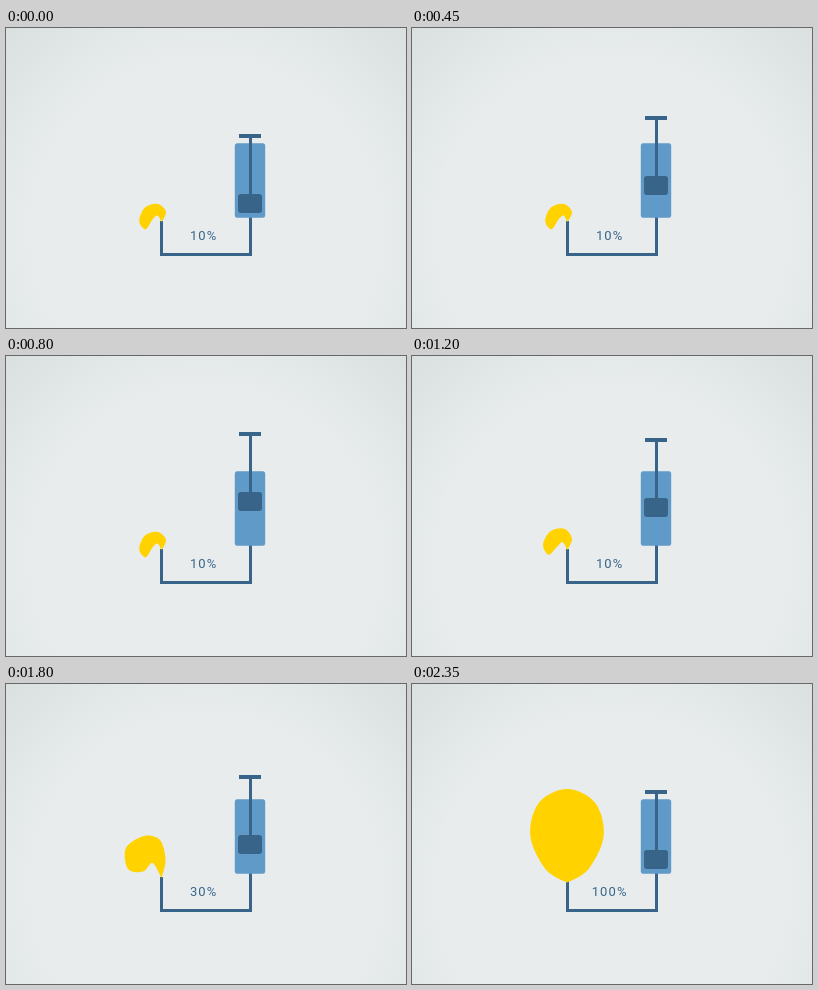
Write an HTML page that moves like this. It is 400x300 px and loops after 2.9 s.

```html
<!DOCTYPE html>
<html lang="en">
<head>
<meta charset="utf-8">
<title>Balloon pump</title>
<style>
  html, body { margin: 0; width: 100%; height: 100%; overflow: hidden; background: #e8eced; }
  svg { display: block; width: 100%; height: 100%; }
  text { font: 400 13px Roboto, "Open Sans", sans-serif; letter-spacing: 1.1px; fill: #38648a; }
</style>
</head>
<body>
<svg viewBox="0 0 400 300">
  <defs>
    <radialGradient id="glow" gradientUnits="userSpaceOnUse" cx="200" cy="205" r="290">
      <stop offset=".6" stop-color="#e8eced"/>
      <stop offset="1" stop-color="#d9e0df"/>
    </radialGradient>
  </defs>
  <rect width="400" height="300" fill="url(#glow)"/>
  <path d="M155.5 193V226.5H244.5V188" fill="none" stroke="#38648a" stroke-width="3"/>
  <rect x="228.8" y="115.3" width="30.4" height="74.4" rx="2.5" fill="#5f9ac8"/>
  <g id="plunger" fill="#38648a">
    <rect x="233" y="106" width="22" height="4"/>
    <rect x="243" y="108" width="3" height="60"/>
    <rect x="232" y="166" width="24" height="19" rx="3"/>
  </g>
  <path id="balloon" fill="#ffd200"/>
  <text id="label" x="197.6" y="212" text-anchor="middle"></text>
</svg>
<script>
const LOOP = 2900, RISE_END = 800, SAG_END = 1800, BURST = 2200, FULL = 2350;
const plunger = document.getElementById("plunger");
const balloon = document.getElementById("balloon");
const label = document.getElementById("label");

// Outlines start at the neck and run up the right side and round.
const neck = [155.5, 194];
const limp = [neck, [160,184], [152,176], [139,179.5], [133.2,193], [139.5,201.3], [146.5,191.5], [151.5,187.5]];
const sagging = [neck, [159.5,176], [154,156], [138,152], [120,164], [122,185], [137,187.5], [146.5,179]];
const swelling = [neck, [163,178], [161,146], [146,134.8], [126,142], [121.5,167], [133,182.5], [149,186]];
const full = limp.map((_, i) => {
  const a = i / limp.length * 2 * Math.PI;
  return [155 + 40.7 * Math.sin(a) * Math.sin(a / 2) ** .3, 151.8 + 46.8 * Math.cos(a)];
});

const mix = (a, b, k) => a.map((p, i) => p.map((v, n) => v + (b[i][n] - v) * k));
const progress = (t, from, to) => Math.max(0, Math.min(1, (t - from) / (to - from)));

function outline(t) {
  if (t <= SAG_END) return mix(limp, sagging, progress(t, RISE_END, SAG_END) ** 2);
  if (t <= BURST) return mix(sagging, swelling, progress(t, SAG_END, BURST));
  return mix(swelling, full, progress(t, BURST, FULL));
}

// Smooth curve through the points with a sharp corner at the neck.
function curve(pts) {
  const all = [...pts, pts[0]], last = all.length - 1;
  const at = i => all[Math.max(0, Math.min(last, i))];
  const ctrl = (p, a, b) => p.map((v, n) => v + (b[n] - a[n]) / 6);
  let d = "M" + all[0];
  for (let i = 0; i < last; i++) {
    const p = at(i), q = at(i + 1);
    d += `C${ctrl(p, at(i - 1), q)} ${ctrl(q, at(i + 2), p)} ${q}`;
  }
  return d + "Z";
}

const lift = t => 30 * progress(t, 0, 750)
  - 21 * progress(t, RISE_END, BURST) - 9 * progress(t, BURST, FULL);

const percent = t => 10 + 10 * Math.max(0, Math.floor((Math.min(t, BURST) - 1000) / 400))
  + 60 * progress(t, BURST, FULL);

// The scene moves in steps: short ones for the strokes, long ones while filling.
function snap(t) {
  const step = t < RISE_END || t >= BURST ? 50 : 200;
  return Math.floor(t / step) * step;
}

const start = performance.now();
function frame() {
  const t = snap((performance.now() - start) % LOOP);
  plunger.setAttribute("transform", `translate(0 ${-lift(t)})`);
  balloon.setAttribute("d", curve(outline(t)));
  label.textContent = Math.round(percent(t)) + "%";
  requestAnimationFrame(frame);
}
frame();
</script>
</body>
</html>
```
